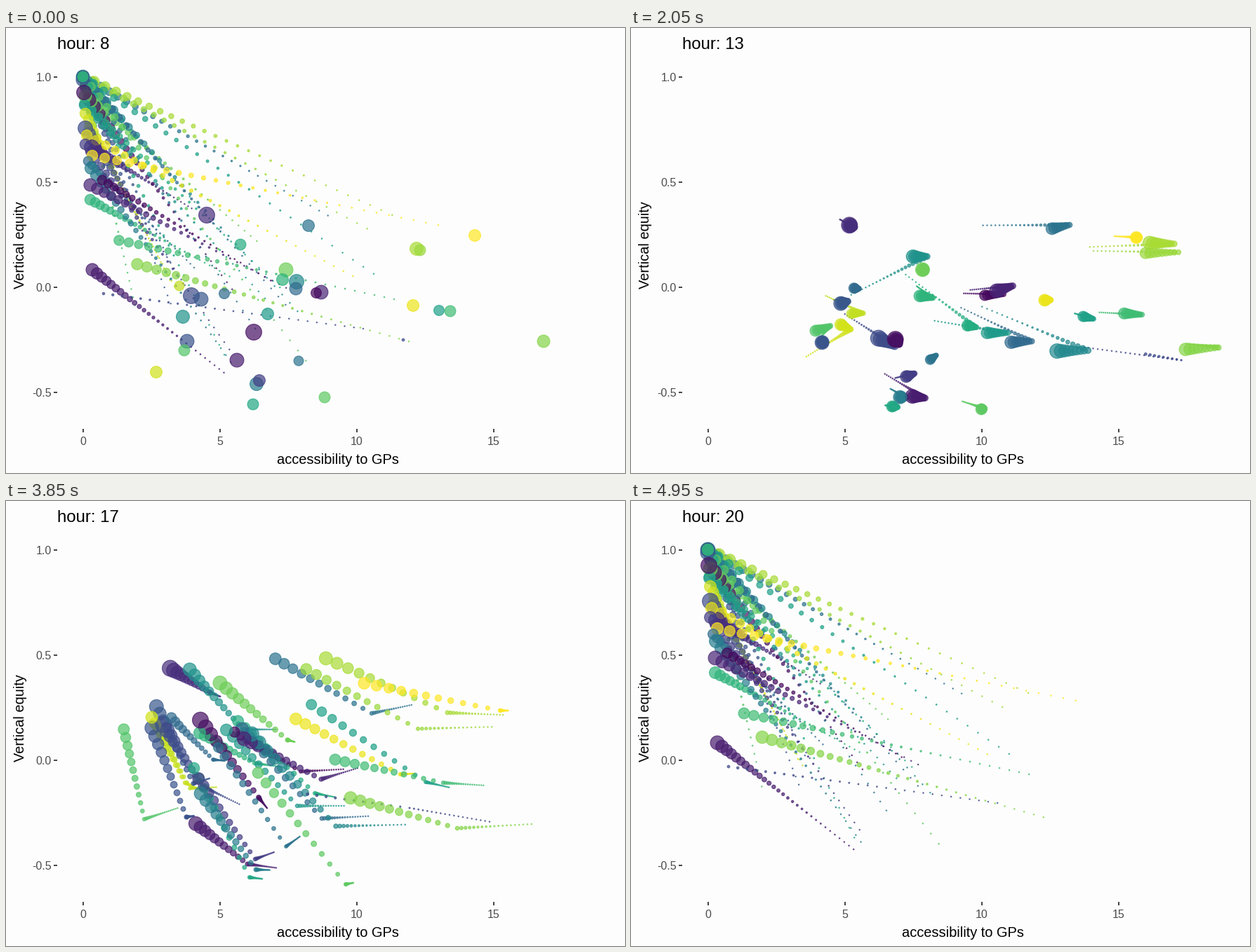
These frames come from a looping animation (882x635 px, 5 s). A matplotlib script:

```python
import matplotlib.pyplot as plt
import numpy as np
from matplotlib.animation import FuncAnimation

W, H, DPI = 882, 635, 100
FRAMES, INTERVAL = 100, 50
SPAN = 33            # frames between two surveyed hours
WAKE = 30            # length of the fading trail in frames
STROKE = 1.28        # outline of a dot, px
PT = 72 / DPI        # points per pixel

plt.rcParams["font.family"] = "Liberation Sans"

# Places on the stage (px, y down) at 8, 12, 16 and 20 o'clock.
at_8 = [
    (286, 267), (431, 282), (334, 309), (668, 296), (585, 315), (590, 317),
    (399, 345), (394, 359), (414, 362), (413, 372), (449, 377), (442, 378),
    (247, 368), (264, 382), (278, 387), (311, 379), (252, 412), (373, 408),
    (580, 396), (617, 403), (633, 404), (353, 434), (258, 447), (254, 460),
    (329, 474), (417, 475), (766, 447), (566, 445), (214, 491), (357, 508),
    (361, 503), (454, 527), (352, 537)]
at_12 = [
    (318, 284), (625, 281), (492, 427), (725, 299), (774, 308), (780, 320),
    (420, 346), (430, 385), (651, 460), (571, 447), (544, 368), (531, 380),
    (331, 407), (376, 454), (309, 390), (325, 372), (422, 326), (537, 435),
    (598, 388), (659, 415), (728, 409), (382, 451), (277, 448), (284, 425),
    (419, 528), (435, 467), (837, 456), (784, 474), (313, 430), (392, 527),
    (404, 493), (504, 543), (380, 541)]
at_16 = [
    (290, 273), (521, 303), (440, 417), (704, 299), (629, 302), (587, 325),
    (401, 341), (354, 374), (470, 464), (450, 453), (449, 397), (420, 386),
    (262, 410), (280, 407), (267, 403), (295, 369), (338, 326), (415, 435),
    (562, 390), (598, 401), (623, 402), (360, 423), (257, 451), (197, 454),
    (344, 518), (399, 493), (643, 467), (575, 438), (255, 402), (356, 526),
    (355, 511), (484, 547), (347, 537)]
HOME = (109.5, 69.5)
at_20 = [
    (122, 170), HOME, (112, 108), (123, 182), HOME, HOME,
    (113, 97), (120, 245), HOME, HOME, (120, 224), (137, 217),
    (118, 140), (113, 143), (109, 74), (117, 190), HOME, (112, 110),
    (115, 153), HOME, (161, 303), (111, 92), HOME, HOME,
    (123, 345), HOME, (187, 337), (139, 379), (113, 122), (121, 200),
    (113, 166), HOME, HOME]

radius = np.array([
    12, 9, 8.5, 9, 10, 8.5, 10.5, 9, 11, 9.5, 10.5, 8, 7.5, 12, 10.5, 8, 10,
    9, 9, 8, 8.5, 12, 10.5, 8.5, 10.5, 7.5, 9.5, 2.4, 9, 10, 9, 8.5, 8.5])
tone = np.array([
    .13, .38, .62, 1, .87, .85, .78, .65, .47, .34, .1, .02, .91, .23, .27,
    .34, .51, .54, .97, .57, .69, .04, .26, .73, .08, .38, .82, .22, .93, .42,
    .18, .75, .6])

keys = np.array([at_8, at_12, at_16, at_20], float)


def places(frame):
    """Dot positions in one frame, moving evenly between the hours."""
    leg, step = divmod(frame % FRAMES, SPAN)
    if leg == len(keys) - 1:
        return keys[-1]
    return keys[leg] + (keys[leg + 1] - keys[leg]) * step / SPAN


path = [places(i) for i in range(FRAMES)]
ages = np.arange(WAKE - 1, -1, -1)

fig = plt.figure(figsize=(W / DPI, H / DPI), dpi=DPI, facecolor="#fdfdfd")
ax = fig.add_axes([0, 0, 1, 1])
ax.set_xlim(0, W)
ax.set_ylim(H, 0)
ax.axis("off")


def label(x, y, text, size, color="black", **kw):
    return ax.text(x, y, text, fontsize=size * PT, color=color,
                   va="baseline", **kw)


def tick(xs, ys):
    ax.plot(xs, ys, color="#333333", lw=1.8 * PT, solid_capstyle="butt")


for k in range(4):
    x, y = 109.5 + 195 * k, 70 + 150 * k
    tick([x, x], [572, 577])
    tick([68, 73], [y, y])
    label(x, 595, str(5 * k), 16, "#4d4d4d", ha="center")
    label(64.5, y + 6.5, f"{1 - k / 2:.1f}", 16, "#4d4d4d", ha="right")

label(472.5, 621.5, "accessibility to GPs", 20, ha="center")
label(26.5, 310, "Vertical equity", 20, ha="center", rotation=90,
      rotation_mode="anchor")
title = label(73, 30, "", 24, ha="left")

# Trail dots shrink with the cube of their remaining life.
life = (1 - ages / WAKE) ** 3
dot_r = STROKE / 2 + np.outer(life, radius - STROKE)
colors = plt.cm.viridis(np.tile(tone, WAKE))
colors[:, 3] = 0.7
dots = ax.scatter(np.zeros(dot_r.size), np.zeros(dot_r.size),
                  s=(2 * dot_r.ravel() * PT) ** 2, facecolors=colors,
                  edgecolors=colors, linewidths=STROKE * PT, zorder=3)


def draw(frame):
    dots.set_offsets(np.vstack([path[(frame - a) % FRAMES] for a in ages]))
    title.set_text(f"hour: {round(8 + 12 * frame / (FRAMES - 1))}")
    return dots, title


anim = FuncAnimation(fig, draw, frames=FRAMES, interval=INTERVAL,
                     init_func=lambda: draw(0), repeat=True, repeat_delay=0)
plt.show()
```
